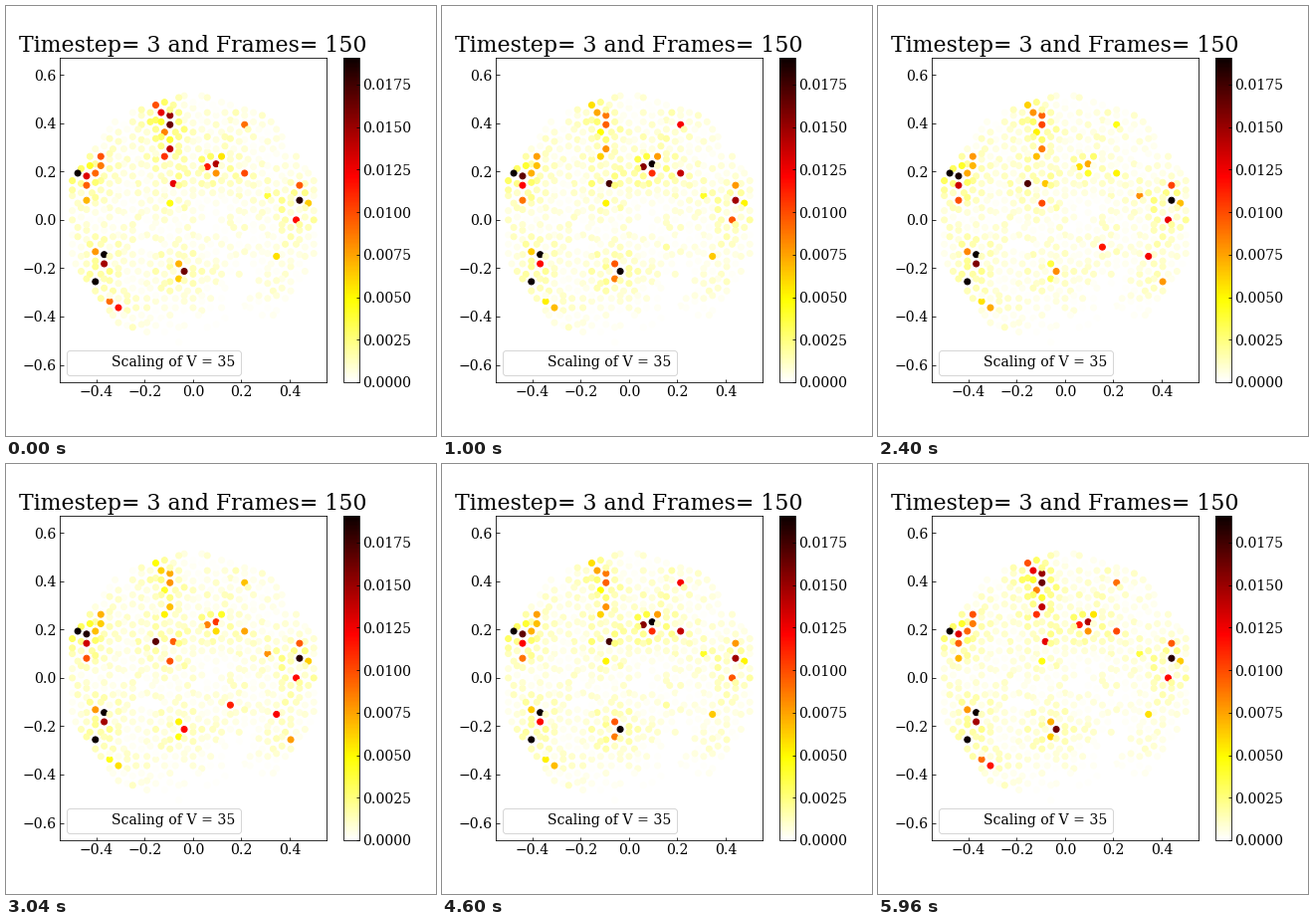
These frames come from a looping animation (432x432 px, 6000 ms). A matplotlib script:

```python
import numpy as np
import matplotlib.pyplot as plt
from matplotlib.animation import FuncAnimation

FRAMES, INTERVAL = 150, 40
VMAX = 0.01908
EDGE = 0.03835

plt.rcParams.update({
    "font.family": "DejaVu Serif", "font.size": 14,
    "xtick.direction": "in", "ytick.direction": "in",
})


def unit(deg):
    a = np.radians(deg)
    return np.stack([np.cos(a), np.sin(a)], axis=-1)


def penrose_sites():
    """Five-fold Penrose vertices by cut and project, cropped to a decagon."""
    star = unit(90 + 72 * np.arange(5))
    r = np.arange(-12, 13)
    n = np.stack(np.meshgrid(r, r, r, r, indexing="ij"), -1).reshape(-1, 4)
    pos = n @ star[1:]
    inside = np.abs(pos @ unit(36 * np.arange(5)).T).max(axis=1) < 13.06
    n, pos = n[inside], pos[inside]

    level = (n.sum(axis=1) + 2) % 5
    perp = n @ star[[2, 4, 1, 3]]
    sign = np.where(level % 2 == 0, 1, -1)
    size = np.where((level == 1) | (level == 4), 0.809, 1.309)
    reach = (sign[:, None] * (perp @ star.T)).max(axis=1)
    return EDGE * pos[(level > 0) & (reach < size)]


# Brightness of each mode at the key times; the first two states come back
KEYS = [0, 25, 43, 76, 100, 115, 149, 150]
MODES = {
    "west": [0, .6, .95, .9, .5],
    "edge": [.38, 0, .67, .38, 1],
    "north": [.95, .2, .55, .04, 1],
    "core": [.72, 1, .15, .52, .03],
    "south": [0, .1, 1, .95, .87],
}
NAMES = list(MODES)
levels = np.array([m + [m[1], m[0], m[0]] for m in MODES.values()])


def cluster(mode, peak, dim, floor, *points):
    """Sites from brightest to dimmest: x, y, low %, high %, mode."""
    high = np.geomspace(peak, dim, len(points))
    mode = np.full(len(points), NAMES.index(mode))
    return np.column_stack([points, floor * high, high, mode])


spots = np.vstack([
    cluster("west", 100, 100, 1,
            (-.481, .189), (-.407, -.254), (-.372, -.141)),
    cluster("west", 100, 53, .68,
            (-.444, .177), (-.444, .14), (-.444, .078)),
    cluster("north", 52, 46, .7,
            (-.385, .257), (-.409, .189), (-.385, .22)),
    cluster("north", 88, 45, .45,
            (-.096, .387), (-.096, .422), (-.096, .286), (-.133, .435),
            (-.312, -.357), (-.121, .257), (-.154, .467), (-.347, -.332),
            (-.121, .36)),
    cluster("edge", 125, 43, .62,
            (.44, .078), (-.372, -.18), (.427, 0), (.44, .138),
            (-.407, -.13), (.477, .068)),
    cluster("core", 116, 40, .04,
            (-.038, -.211), (.094, .228), (-.084, .146), (.061, .216),
            (.213, .189), (.213, .389), (.094, .191), (-.061, -.18),
            (-.061, -.242), (.118, .257)),
    cluster("south", 92, 42, .06,
            (-.154, .146), (.153, -.11), (.405, -.254)),
    cluster("south", 66, 43, .45,
            (.345, -.151), (-.096, .068), (.31, .101)),
])
low, high = spots[:, 2], spots[:, 3]
owner = spots[:, 4].astype(int)

sites = penrose_sites()
dist = np.hypot(*(sites[:, None] - spots[None, :, :2]).transpose(2, 0, 1))
nearest = dist.argmin(axis=0)
rng = np.random.default_rng(35)
grain = rng.random(len(sites))
halo = 0.065 * np.exp(-(dist / (2.2 * EDGE)) ** 2) * (0.25 + grain[:, None])
cover = np.minimum(1, np.exp(-(dist / (3.8 * EDGE)) ** 2).sum(axis=1))
base = 6 * rng.random(len(sites)) ** 2 * cover


def density(i):
    k = np.searchsorted(KEYS, i, side="right") - 1
    f = (i - KEYS[k]) / (KEYS[k + 1] - KEYS[k])
    f = (1 - np.cos(np.pi * f)) / 2
    level = (levels[:, k] * (1 - f) + levels[:, k + 1] * f)[owner]
    lit = np.minimum(100, low + level * (high - low))
    value = np.minimum(base + halo @ lit, 26)
    value[nearest] = lit
    return value / 100 * VMAX


fig, ax = plt.subplots(figsize=(6, 6), dpi=72)
fig.subplots_adjust(left=0.125, right=0.9, bottom=0.125, top=0.88)
dots = ax.scatter(*sites.T, c=density(0), s=36, cmap="hot_r", vmin=0, vmax=VMAX)
fig.colorbar(dots)
ax.set_xlim(-0.552, 0.552)
ax.set_ylim(-0.672, 0.672)
ax.set_xticks(np.linspace(-0.4, 0.4, 5))
ax.set_title("Timestep= 3 and Frames= 150", fontsize=22)
ax.plot([], [], " ", label="Scaling of V = 35")
ax.legend(loc="lower left")


def update(i):
    dots.set_array(density(i))
    return (dots,)


anim = FuncAnimation(fig, update, frames=FRAMES, interval=INTERVAL,
                     repeat=True, repeat_delay=0, blit=False)
plt.show()
```
